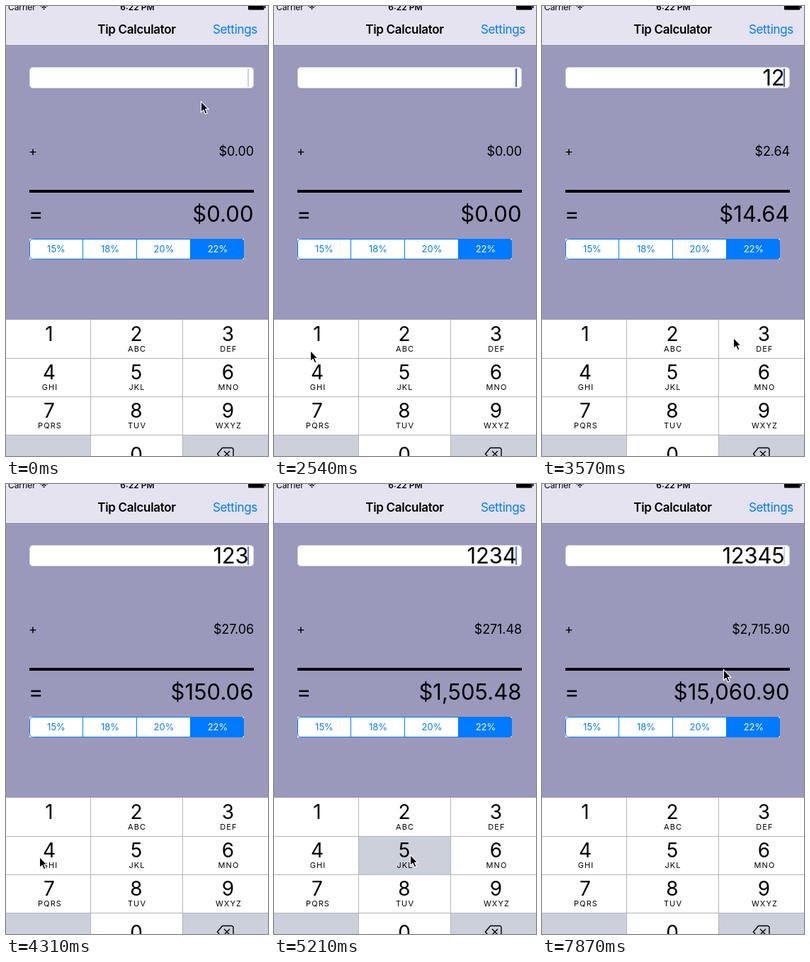
Animation of 370 by 634 pixels, one loop 8 s. Source, as an HTML page:

```html
<!DOCTYPE html>
<html lang="en">
<head>
<meta charset="utf-8">
<title>Tip Calculator</title>
<style>
  html, body { margin: 0; width: 100%; height: 100%; overflow: hidden; background: #9a99bb; }
  svg { display: block; font-family: Inter, Roboto, sans-serif; }
  .middle { text-anchor: middle; }
  .end { text-anchor: end; }
  .large { font-size: 31px; letter-spacing: -.2px; }
  .small { font-size: 18px; letter-spacing: -.1px; }
  .digit { font-size: 28px; }
  .letters { font-size: 11px; letter-spacing: 1.1px; }
  .segment { font-size: 13px; fill: #007aff; }
  #total { letter-spacing: .05px; }
</style>
</head>
<body>
<svg width="370" height="634" viewBox="0 0 370 634">
  <rect width="370" height="634" fill="#9a99bb"/>

  <rect width="370" height="55" fill="#e4e3ef"/>
  <rect y="55" width="370" height="1" fill="#8786a2"/>
  <text x="3" y="6" font-size="12" letter-spacing="-.1">Carrier</text>
  <g fill="none" stroke="#000" stroke-width="1.6">
    <path d="M48.500 .5Q53.500-4 58.500 .5M50.500 2.500Q53.500 0 56.500 2.500"/>
    <path d="M52.500 4.200h2"/>
  </g>
  <text x="185.500" y="6" class="middle" font-size="12" font-weight="600">6:22 PM</text>
  <rect x="342" y="-4" width="22.500" height="9.500" rx="1.500"/>
  <rect x="365" y="-1" width="1.500" height="4"/>
  <text x="184.500" y="39" class="middle" font-size="17" font-weight="600" letter-spacing="-.3">Tip Calculator</text>
  <text x="355" y="39" class="end" font-size="17" letter-spacing="-.3" fill="#007aff">Settings</text>

  <rect x="33.500" y="86.500" width="316" height="29" rx="4.500" fill="#fff" stroke="#dddde6" stroke-width=".7"/>
  <text id="bill" x="342.500" y="112" class="large end"></text>
  <rect id="caret" x="341" y="88" width="2" height="26" fill="#3f5fd8"/>

  <text x="32" y="211" class="small">+</text>
  <text id="tip" x="350" y="211" class="small end"></text>
  <rect x="33" y="259" width="317" height="4"/>
  <text x="32" y="304" class="large">=</text>
  <text id="total" x="349.500" y="304" class="large end"></text>

  <rect x="33" y="328" width="303" height="29" fill="#fff"/>
  <rect x="33.500" y="328.500" width="302" height="28" rx="4" fill="#fff" stroke="#007aff"/>
  <path d="M260 328h72a4 4 0 0 1 4 4v21a4 4 0 0 1-4 4h-72z" fill="#007aff"/>
  <path d="M108.500 328v29M184.500 328v29" stroke="#007aff"/>
  <g id="segments"></g>

  <rect y="442" width="370" height="192" fill="#fff"/>
  <path d="M0 604h119v30H0zM250 604h120v30H250z" fill="#cbd0db"/>
  <rect id="pressed" height="54" fill="#cbd0db"/>
  <path d="M119.500 442v192M249.500 442v192M0 496.500h370M0 550.500h370M0 604.500h370" stroke="#b3b5ba"/>
  <g id="keys"></g>
  <path d="M305.500 622.500h13a2.500 2.500 0 0 1 2.500 2.500v12a2.500 2.500 0 0 1-2.500 2.500h-13l-7-8.500zM308 627l8 8M316 627l-8 8"
        fill="none" stroke="#000" stroke-width="1.400" stroke-linejoin="round"/>

  <path id="pointer" d="M.5 .5V15.500L4 12.300L6.500 18L9 17L6.600 11.400H11Z" stroke="#fff" stroke-width="1.100"/>
</svg>
<script>
const LOOP = 8000, STEP = 148.4;
const TIP_RATE = 0.22;
const COLUMNS = [0, 120, 250, 370];
const KEY_CENTERS = [61, 184, 313.5];

// Each press lasts one step; the digit appears on release.
const presses = [18, 21, 25, 31, 35];

// Pointer path: [step, x, y]
const path = [
  [0, 275, 134], [13, 275, 134], [17, 51, 485], [18, 53, 488], [19, 53, 488],
  [20, 167, 458], [21, 178, 465], [22, 178, 465], [25, 302, 468], [26, 302, 468],
  [28, 84, 501], [29, 47, 525], [30, 51, 523], [32, 51, 523],
  [35, 192, 522], [37, 192, 522], [43, 233, 308], [44, 234, 305],
  [45, 236, 305], [47, 236, 305], [48, 237, 304], [49, 236, 305],
  [52, 236, 305], [53, 256, 261]
];

const $ = id => document.getElementById(id);
const label = (x, y, className, text, extra = "") =>
  `<text x="${x}" y="${y}" class="middle ${className}" ${extra}>${text}</text>`;
const money = value => "$" + value.toLocaleString("en-US",
  { minimumFractionDigits: 2, maximumFractionDigits: 2 });

$("segments").innerHTML = [15, 18, 20, 22].map((rate, i) =>
  label(71 + 76 * i, 347, "segment", rate + "%", i === 3 ? 'style="fill:#fff"' : "")).join("");

$("keys").innerHTML = ["", "ABC", "DEF", "GHI", "JKL", "MNO", "PQRS", "TUV", "WXYZ"]
  .map((letters, i) => {
    const x = KEY_CENTERS[i % 3], y = 472 + 54 * Math.floor(i / 3);
    return label(x, y, "digit", i + 1) + label(x + 1, y + 15, "letters", letters);
  }).join("") + label(184, 642, "digit", 0);

function pointerAt(step) {
  const next = path.findIndex(point => point[0] > step);
  if (next < 0) return path[path.length - 1].slice(1);
  const [s0, x0, y0] = path[next - 1], [s1, x1, y1] = path[next];
  const u = (step - s0) / (s1 - s0), ease = u * u * (3 - 2 * u);
  return [x0 + (x1 - x0) * ease, y0 + (y1 - y0) * ease];
}

// The caret is on for three steps, fades for one and is off for three.
function caretOpacity(step, typed) {
  const start = typed ? presses[typed - 1] + 1 : 3;
  const phase = step === 0 ? 3 : (step - start + 7) % 7;
  if (phase < 3) return 1;
  if (phase > 3) return 0;
  return typed > 0 && typed < 5 ? 0.8 : 0.3;
}

function draw(now) {
  const step = Math.floor(now % LOOP / STEP);
  const typed = presses.filter(press => step > press).length;
  const digits = "12345".slice(0, typed), bill = Number(digits);

  $("bill").textContent = digits;
  $("tip").textContent = money(bill * TIP_RATE);
  $("total").textContent = money(bill * (1 + TIP_RATE));
  $("caret").setAttribute("opacity", caretOpacity(step, typed));

  const key = presses.indexOf(step), column = Math.max(key, 0) % 3;
  const pressed = $("pressed");
  pressed.setAttribute("visibility", key < 0 ? "hidden" : "visible");
  pressed.setAttribute("x", COLUMNS[column]);
  pressed.setAttribute("y", key < 3 ? 442 : 496);
  pressed.setAttribute("width", COLUMNS[column + 1] - COLUMNS[column]);

  const [x, y] = pointerAt(step).map(Math.round);
  $("pointer").setAttribute("transform", `translate(${x} ${y})`);
}

const begin = performance.now();
function tick() {
  draw(performance.now() - begin);
  requestAnimationFrame(tick);
}
tick();
</script>
</body>
</html>
```
